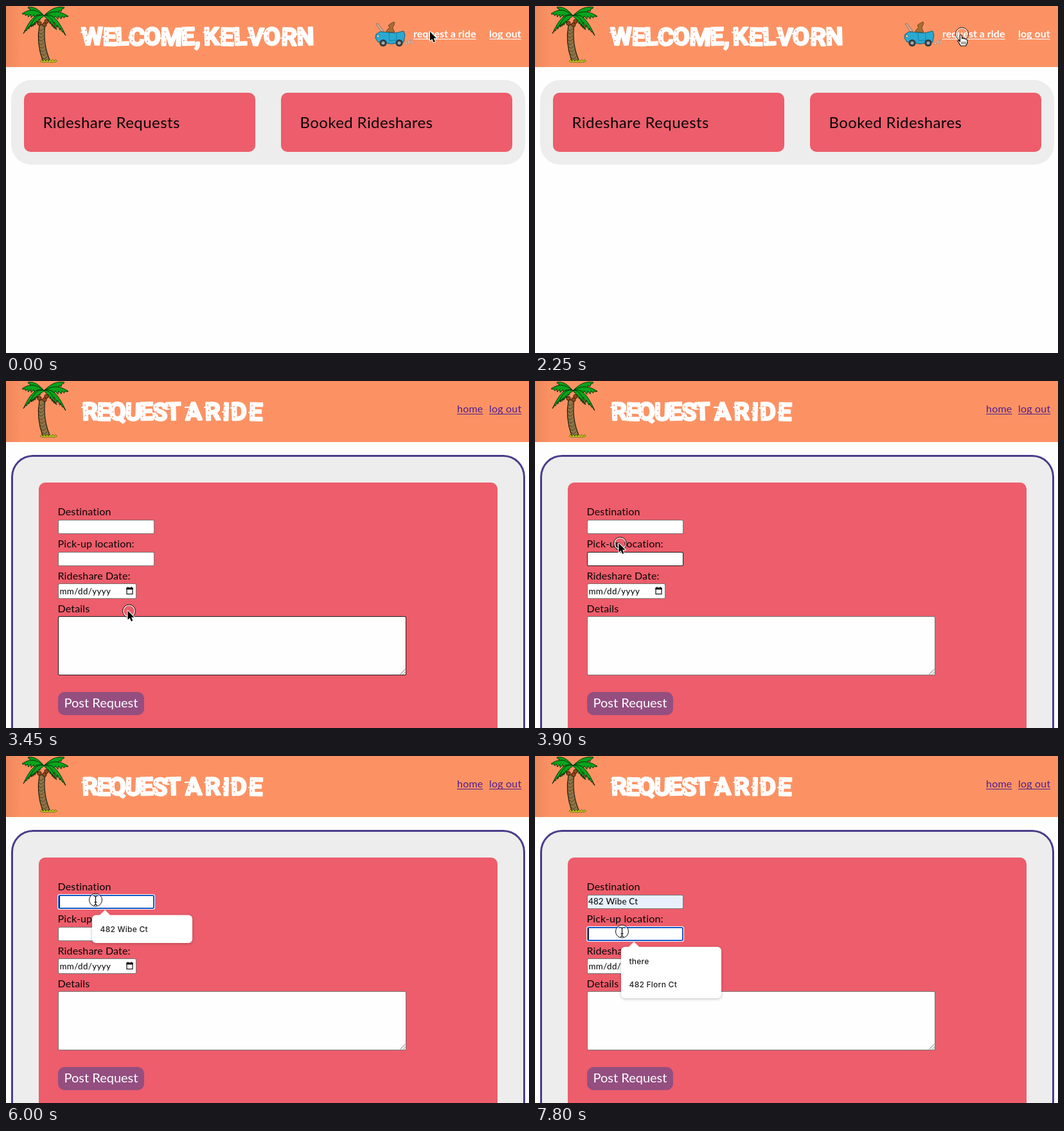
Write an HTML page with a canvas that moves like this. It is 814 px wide and 540 px high and loops after 8 s.

```html
<!DOCTYPE html>
<html lang="en">
<head>
<meta charset="utf-8">
<title>Rideshare</title>
<style>
html, body { margin: 0; width: 100%; height: 100%; overflow: hidden; background: #fefefe; }
canvas { display: block; width: 814px; height: 540px; }
</style>
</head>
<body>
<canvas id="stage" width="814" height="540"></canvas>
<script>
const ctx = document.getElementById('stage').getContext('2d');
const LOOP = 8000;
const ORANGE = '#fc9264', RED = '#ed5d6b', GRAY = '#ededed', INDIGO = '#4f1d8d';
const BODY = 'Lato, sans-serif', ARIAL = '"Liberation Sans", Arial, sans-serif';
const ADDRESS = '482 Wibe Ct', ADDRESS_2 = '482 Florn Ct';

// Pointer poses: start time, ring centre x, y, pointer shape
const POSES = [
  [0, 662, 40.5, 'arrow'],
  [2100, 663.5, 42.5, 'hand'],
  [2250, 664.5, 43.5, 'hand'],
  [2850, 664.5, 44, 'arrow'],
  [3000, 637.5, 86, 'arrow'],
  [3150, 379.5, 303, 'arrow'],
  [3300, 269.5, 374.5, 'beam'],
  [3450, 191.5, 358, 'arrow'],
  [3600, 150, 282.5, 'beam'],
  [3750, 132.5, 254, 'arrow'],
  [3900, 132.5, 253, 'arrow'],
  [5550, 136.5, 238, 'arrow'],
  [5700, 136.5, 234, 'beam'],
  [5850, 139.5, 224, 'beam'],
  [6750, 151.5, 235.5, 'beam'],
  [6900, 158.5, 268.5, 'arrow'],
  [7050, 159, 269.5, 'arrow'],
  [7350, 159, 269.5, 'beam'],
  [7500, 149.5, 270, 'beam'],
  [7650, 135.5, 273, 'beam']
];

const between = (t, a, b) => t >= a && t < b;

function text(str, x, y, font, color, spacing = 0) {
  ctx.font = font;
  ctx.letterSpacing = spacing + 'px';
  ctx.fillStyle = color;
  ctx.fillText(str, x, y);
  return ctx.measureText(str).width;
}

function link(str, x, y, color, weight = '', spacing = 0.2) {
  const w = text(str, x, y, `${weight} 16px ${BODY}`, color, spacing);
  ctx.fillRect(x, y + 2, w, 1);
}

function box(x, y, w, h, r, fill) {
  ctx.beginPath();
  ctx.roundRect(x, y, w, h, r);
  ctx.fillStyle = fill;
  ctx.fill();
}

function poly(pts, fill, stroke, width = 1) {
  ctx.beginPath();
  pts.forEach(([x, y]) => ctx.lineTo(x, y));
  if (fill) {
    ctx.closePath();
    ctx.fillStyle = fill;
    ctx.fill();
  }
  if (stroke) {
    ctx.strokeStyle = stroke;
    ctx.lineWidth = width;
    ctx.stroke();
  }
}

function disc(x, y, r, fill, stroke, width = 1) {
  ctx.beginPath();
  ctx.arc(x, y, r, 0, Math.PI * 2);
  if (fill) {
    ctx.fillStyle = fill;
    ctx.fill();
  }
  if (stroke) {
    ctx.strokeStyle = stroke;
    ctx.lineWidth = width;
    ctx.stroke();
  }
}

// Wobbly lettering with carved dots and small spikes
function title(word, x, spacing) {
  [...word].forEach((ch, i) => {
    ctx.save();
    ctx.translate(x, 61);
    ctx.rotate((i % 2 ? 1 : -1) * 0.03);
    ctx.lineJoin = 'round';
    const w = text(ch, 0, 0, '700 38px Roboto, sans-serif', '#fff');
    ctx.strokeStyle = '#fff';
    ctx.lineWidth = 2.6;
    ctx.strokeText(ch, 0, 0);
    if (ch !== ',') {
      ctx.fillRect(-1, -21 + (i * 7) % 13, 7, 2);
      for (let k = 0; k < 3; k++) disc(w * 0.2 + k % 2, k * 8 - 23 + i % 3, 1, ORANGE);
    }
    ctx.restore();
    x += w + spacing;
  });
}

function frond(tx, ty, lift, fat) {
  const cx = 59, cy = 15, mx = (cx + tx) / 2, my = (cy + ty) / 2 - lift, n = 14;
  const spine = s => [
    (1 - s) ** 2 * cx + 2 * s * (1 - s) * mx + s * s * tx,
    (1 - s) ** 2 * cy + 2 * s * (1 - s) * my + s * s * ty
  ];
  const pts = [];
  for (let i = 0; i <= n; i++) {
    const [x, y] = spine(i / n);
    pts.push([x, y - fat * 0.35 * Math.sin(Math.PI * i / n)]);
  }
  for (let i = n; i >= 0; i--) {
    const [x, y] = spine(i / n);
    const drop = fat * Math.sin(Math.PI * i / n) * (i % 2 ? 1.3 : 0.6);
    pts.push([x + Math.sign(tx - cx) * drop * 0.3, y + drop]);
  }
  poly(pts, '#08a51b', '#06200a', 0.9);
}

function palm() {
  ctx.beginPath();
  ctx.moveTo(52, 30);
  ctx.quadraticCurveTo(47, 57, 57, 85);
  ctx.lineTo(68, 84);
  ctx.quadraticCurveTo(57, 58, 61, 28);
  ctx.closePath();
  ctx.fillStyle = '#8c7549';
  ctx.fill();
  ctx.strokeStyle = '#241c0c';
  ctx.lineWidth = 1.2;
  ctx.stroke();
  for (let i = 0; i < 9; i++) {
    const y = 36 + i * 5.5, x = 51 + Math.max(0, i - 4) * 1.3;
    poly([[x, y], [x + 4, y + 2.5], [x + 8, y - 1.5]], null, '#3d301a', 0.8);
  }
  const grass = [];
  for (let i = 0; i <= 12; i++) grass.push([53 + i * 2.2, i % 2 ? 83 : 86]);
  poly([...grass, [76, 87.5], [56, 87.5]], '#b9c916', '#4d5506', 0.6);
  frond(34, 2, 5, 6);
  frond(91, 2, 5, 7);
  frond(25, 12, 9, 7);
  frond(97, 16, 8, 7);
  frond(27, 43, 16, 9);
  frond(93, 46, 17, 9);
  frond(37, 32, 8, 8);
  frond(79, 37, 9, 8);
  [[52, 27], [60, 29], [63, 24]].forEach(([x, y]) => disc(x, y, 3.2, '#8b4a1c', '#2c1404', 0.8));
}

function car() {
  poly([[591, 41], [594, 36], [597, 34], [595, 30], [599, 27], [604, 24.5], [605, 27], [602, 34], [605, 41]],
    '#a86b36', '#5d3818', 0.7);
  poly([[584, 40], [576, 28], [579, 27], [588, 39]], '#d9a58a', '#727272', 0.8);
  poly([[576, 44], [582, 40], [606, 42], [619, 39], [621, 45], [619, 56], [600, 59], [579, 56], [575, 50]],
    '#29a9d1', '#14546d', 0.9);
  poly([[596, 42], [597, 54], [608, 53], [608, 42]], null, '#17779a', 0.8);
  [[587, 57.5], [612, 57.5]].forEach(([x, y]) => {
    disc(x, y, 5.6, '#343c40');
    disc(x, y, 2.6, '#9ba7aa');
  });
  disc(579, 47, 1.8, '#f4eecb', '#555', 0.6);
  [[623, 58, 2], [627, 56, 2.2], [631, 57, 2], [630, 53, 1.3]].forEach(([x, y, r]) =>
    disc(x, y, r, '#d9b5a2', '#a98775', 0.6));
}

function header() {
  ctx.fillStyle = ORANGE;
  ctx.fillRect(0, 0, 814, 95);
  const shade = ctx.createLinearGradient(0, 0, 26, 0);
  shade.addColorStop(0, 'rgba(120,50,20,.1)');
  shade.addColorStop(1, 'rgba(120,50,20,0)');
  ctx.fillStyle = shade;
  ctx.fillRect(0, 0, 26, 95);
  palm();
}

function homePage() {
  title('WELCOME,', 118, -0.8);
  title('KELVORN', 308, 0.6);
  car();
  link('request a ride', 634, 49, '#fff', 'bold', 0);
  link('log out', 752, 49, '#fff', 'bold', 0);
  box(8, 115, 800, 132, 32, GRAY);
  box(28, 135, 360, 92, 10, RED);
  box(428, 135, 360, 92, 10, RED);
  text('Rideshare Requests', 57.5, 189.5, `24px ${BODY}`, '#080406', 0.45);
  text('Booked Rideshares', 457.5, 189.5, `24px ${BODY}`, '#080406', 0.4);
}

function field(x, y, w, h, { hover, focus, fill = '#fff' } = {}) {
  if (focus) {
    box(x - 1, y - 1, w + 2, h + 2, 3.5, '#fff');
    box(x, y, w, h, 3, '#1559c4');
    box(x + 2, y + 2, w - 4, h - 4, 1, fill);
  } else {
    box(x, y, w, h, 2.5, hover ? '#241b1e' : '#767676');
    box(x + 1, y + 1, w - 2, h - 2, 1.5, fill);
  }
}

function caret(x, y) {
  ctx.fillStyle = '#000';
  ctx.fillRect(x, y, 1, 18);
}

function popup(y, h, rows, hover) {
  ctx.save();
  ctx.shadowColor = 'rgba(0,0,0,.25)';
  ctx.shadowBlur = 4;
  ctx.shadowOffsetY = 1;
  box(134, y, 156, h, 6, '#fff');
  ctx.restore();
  poly([[145, y + 1], [154, y - 8], [163, y + 1]], '#fff');
  if (hover) {
    box(138, y + 4, 148, 36, 4, '#f0f0f0');
    poly([[263.5, y + 17.5], [272.5, y + 26.5]], null, '#444', 1.3);
    poly([[272.5, y + 17.5], [263.5, y + 26.5]], null, '#444', 1.3);
  }
  rows.forEach((row, i) => text(row, 146.5, y + 26.5 + i * 36, '500 12px Inter, sans-serif', '#202020', 0.25));
}

function formPage(t) {
  title('REQUEST', 119, -1.9);
  title('A', 279.5, 0);
  title('RIDE', 310, 2.6);
  link('home', 702, 49, INDIGO);
  link('log out', 752, 49, INDIGO);

  box(8, 115, 800, 480, 34, '#483d8b');
  box(11, 118, 794, 474, 31, GRAY);
  box(51, 158, 714, 420, 10, RED);
  ['Destination', 'Pick-up location:', 'Rideshare Date:', 'Details'].forEach((label, i) =>
    text(label, 80.5, 209 + [0, 50, 100, 151][i], `16px ${BODY}`, '#080406', 0.15));

  const filled = t >= 6900;
  field(81, 216, 150, 22, {
    hover: between(t, 5700, 6000), focus: between(t, 6000, 7800), fill: filled ? '#e8f0fe' : '#fff'
  });
  field(81, 266, 150, 22, { hover: between(t, 3750, 5550), focus: t >= 7800 });
  field(81, 315, 122, 24, { hover: between(t, 3600, 3750) });
  field(81, 366, 542, 92, { hover: between(t, 3300, 3600), fill: '#fefefe' });

  if (filled) text(ADDRESS, 83, 231, `13.33px ${t < 7350 ? ARIAL : BODY}`, '#000', t < 7350 ? 0 : 0.2);
  if (between(t, 6000, 6450) || between(t, 7050, 7350)) caret(83, 218);
  if (t >= 7800) caret(83, 268);

  text('mm/dd/yyyy', 83.5, 331.5, `13.33px ${BODY}`, '#000', 0.4);
  ctx.strokeStyle = '#111';
  ctx.lineWidth = 1.2;
  ctx.strokeRect(188, 322.5, 9, 9);
  ctx.fillRect(187.5, 321.5, 10, 3);
  ctx.fillRect(189, 320.5, 1.5, 2);
  ctx.fillRect(194.5, 320.5, 1.5, 2);
  poly([[613.5, 456.5], [621.5, 448.5]], null, '#666', 0.9);
  poly([[618, 456.5], [621.5, 453]], null, '#666', 0.9);

  box(81, 484, 134, 36, 10, '#944e80');
  text('Post Request', 90.5, 508, `20px ${BODY}`, '#fff');

  if (between(t, 6000, 7350)) popup(247.5, 43.5, [ADDRESS], t >= 6900);
  if (t >= 7800) popup(297, 80, ['there', ADDRESS_2]);
}

const SHAPES = {
  arrow() {
    ctx.translate(-2, -0.5);
    ctx.lineJoin = 'round';
    const pts = [[0, 0], [0, 14], [3.2, 11.2], [5.5, 16.4], [7.8, 15.4], [5.6, 10.3], [10, 10.3]];
    poly(pts, '#fff', '#fff', 2);
    poly(pts, '#000');
  },
  hand() {
    ctx.beginPath();
    ctx.moveTo(-3, 12);
    ctx.lineTo(-3, 2.5);
    ctx.quadraticCurveTo(-1.5, 0, 0, 2.5);
    ctx.lineTo(0, 7);
    ctx.quadraticCurveTo(2, 5.5, 3, 7.5);
    ctx.quadraticCurveTo(5, 6.5, 6, 8.5);
    ctx.quadraticCurveTo(8.5, 8, 8.5, 11);
    ctx.quadraticCurveTo(8.5, 15, 6, 18.5);
    ctx.lineTo(-2, 18.5);
    ctx.quadraticCurveTo(-4, 14.5, -6.5, 11.5);
    ctx.quadraticCurveTo(-6, 8.5, -3, 12);
    ctx.closePath();
    ctx.fillStyle = '#fff';
    ctx.fill();
    ctx.strokeStyle = '#000';
    ctx.lineWidth = 1.1;
    ctx.stroke();
    [0, 2.5, 5].forEach(x => poly([[x, 12], [x, 16]], null, '#000', 0.9));
  },
  beam() {
    [['#fff', 2.6], ['#000', 1.1]].forEach(([color, width]) => {
      poly([[-2.5, -6.5], [0, -5], [0, 7], [-2.5, 8.5]], null, color, width);
      poly([[2.5, -6.5], [0, -5], [0, 7], [2.5, 8.5]], null, color, width);
      poly([[-2, 3.5], [2, 3.5]], null, color, width);
    });
  }
};

function pointer(t) {
  const [, x, y, shape] = POSES.findLast(p => p[0] <= t);
  if (t >= 1200) {
    disc(x, y, 9, null, 'rgba(255,255,255,.95)', 1.4);
    disc(x, y, 10, null, '#111', 1);
  }
  ctx.save();
  ctx.translate(x, y);
  SHAPES[shape]();
  ctx.restore();
}

function draw(now) {
  const t = now % LOOP;
  ctx.fillStyle = '#fefefe';
  ctx.fillRect(0, 0, 814, 540);
  header();
  if (t < 2850) homePage();
  else formPage(t);
  pointer(t);
}

const start = performance.now();
function tick(now) {
  draw(Math.max(0, now - start));
  requestAnimationFrame(tick);
}
requestAnimationFrame(tick);
</script>
</body>
</html>
```
